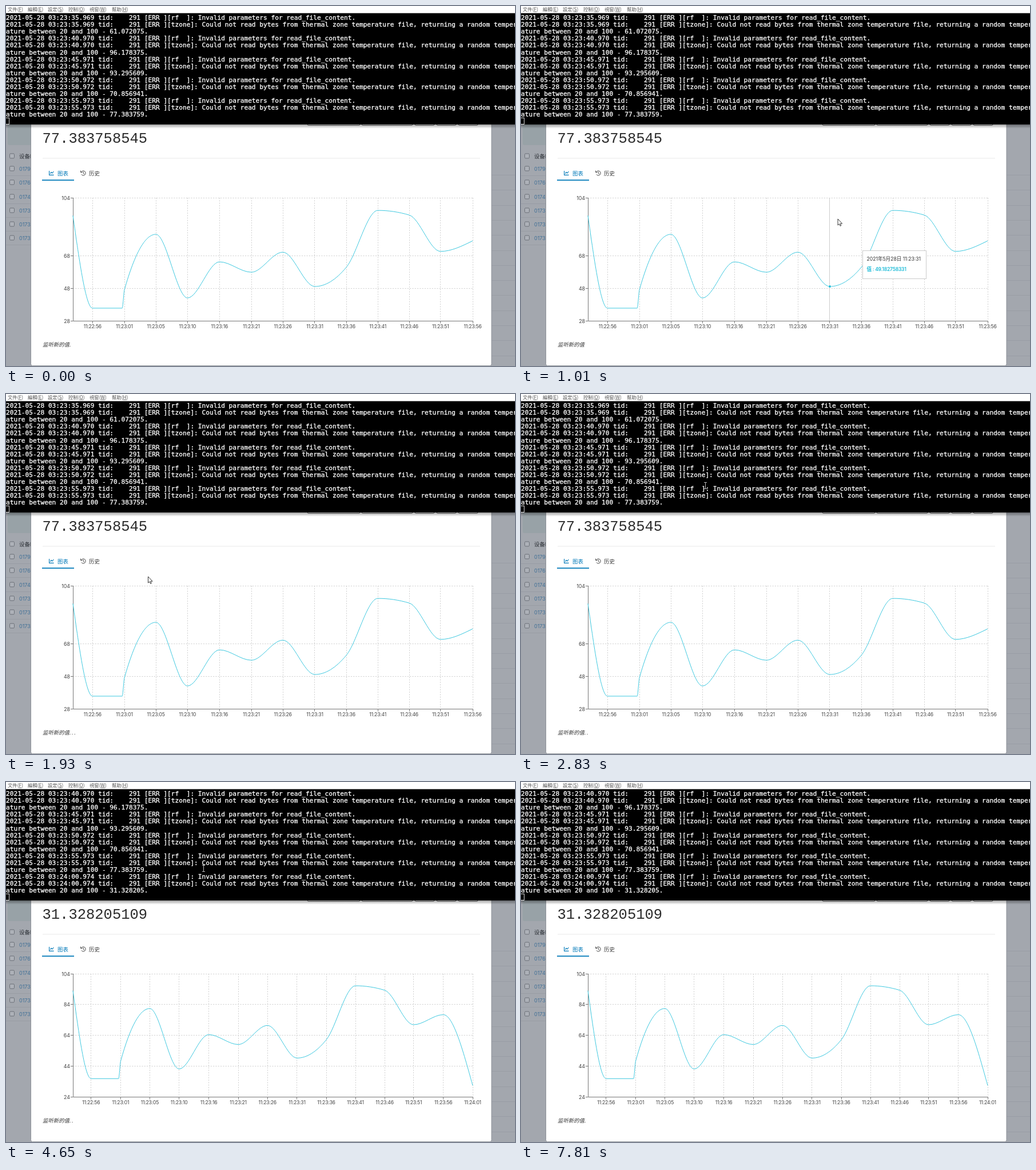
Animation, 890 px wide and 629 px high, one loop 8000 ms. Source, as an HTML page:

```html
<!DOCTYPE html>
<html lang="zh">
<head>
<meta charset="utf-8">
<title>Temperature monitor</title>
<style>
  html, body { margin: 0; width: 100%; height: 100%; overflow: hidden; background: #a3a7ae; }
  svg { display: block; width: 890px; height: 629px; font-family: Inter, "Noto Sans CJK SC", sans-serif; }
  text { white-space: pre; }
  .menu { font: 8.4px "Noto Sans CJK TC", sans-serif; fill: #555; }
  .menu tspan { text-decoration: underline; }
  .term { font: 11.16px "DejaVu Sans Mono", monospace; fill: #fff; }
  .term text { stroke: #fff; stroke-width: .3; }
  .big { font: 25.5px "Liberation Mono", monospace; fill: #2c2c2c; }
  .tick { font-size: 8.8px; fill: #444; }
  .time { font-size: 8.6px; letter-spacing: -.025em; fill: #444; }
  .side { font-size: 9px; fill: #3f6f96; }
  .tab { font-size: 9.4px; }
  .tip { font-size: 8.6px; fill: #333; }
  .wait { font-size: 9.4px; font-style: italic; fill: #333; }
  .grid { stroke: #d0d0d0; stroke-dasharray: 2.15 2.15; fill: none; }
  .axis { stroke: #777; fill: none; }
  .curve { stroke: #3fc9e0; fill: none; }
</style>
</head>
<body>
<svg viewBox="0 0 890 629">
  <defs>
    <linearGradient id="shade" x2="0" y2="1">
      <stop offset="0" stop-opacity=".36"/>
      <stop offset="1" stop-opacity="0"/>
    </linearGradient>
    <clipPath id="screen"><rect y="13" width="890" height="194"/></clipPath>
  </defs>

  <rect width="890" height="629" fill="#a3a7ae"/>
  <rect x="3" y="190" width="60" height="53" rx="3" fill="#98a2a7"/>
  <g id="page"></g>
  <rect x="43.5" y="180.5" width="805.5" height="448" rx="3" fill="#fff" stroke="#8e9299"/>
  <g id="buttons" fill="#fff" stroke="#666"></g>

  <path d="M64 266H829" stroke="#e8e8e8"/>
  <path d="M75.6 288V295.4H83.6M77.4 293L79 290.4L81 292L83.3 289" fill="none" stroke="#0079b8" stroke-width="1.1"/>
  <text class="tab" x="90" y="295.5" fill="#0079b8">图表</text>
  <rect x="63" y="303.4" width="56" height="1.8" fill="#0079b8"/>
  <path d="M131.6 290.2A4 4 0 1 1 131.8 294.2M130.6 287.6V290.6H133.6M135.3 289.6V292.3L137.2 293.6" fill="none" stroke="#444"/>
  <text class="tab" x="145" y="295.5" fill="#333">历史</text>

  <g id="before"></g>
  <g id="after"></g>
  <text class="wait" x="64" y="594.7">监听新的值</text>
  <g id="dots" class="wait"><text x="111" y="594.7">.</text><text x="115" y="594.7">.</text><text x="119.2" y="594.7">.</text></g>

  <g id="hover">
    <path id="rule" d="M0 335V550" stroke="#ccc"/>
    <circle id="spot" r="2.4" fill="#1fbcd8" stroke="#fff" stroke-width=".7"/>
    <g id="tip">
      <rect x=".5" y=".5" width="111" height="49" fill="#fff" stroke="#ccc"/>
      <text id="when" class="tip" x="7.5" y="18"></text>
      <text id="what" class="tip" x="7.5" y="35.5" style="fill:#1fbcd8;font-weight:600;letter-spacing:-.03em"></text>
    </g>
  </g>

  <rect y="207" width="890" height="7" fill="url(#shade)"/>
  <rect width="890" height="13" fill="#fff"/>
  <rect y="12.5" width="890" height="194.5" fill="#000"/>
  <g id="menu" class="menu"></g>
  <g clip-path="url(#screen)" class="term">
    <g id="logBefore"></g>
    <g id="logAfter"></g>
    <rect x="-.5" y="195.5" width="6" height="11" fill="none" stroke="#ddd"/>
  </g>

  <path id="arrow" d="M0 0V11L2.5 8.8L4.1 12.4L5.8 11.7L4.2 8.2H7.6Z" fill="#fff" stroke="#222" stroke-width=".9"/>
  <path id="beam" d="M-2.5 -5.5H2.5M0 -5.5V5.5M-2.5 5.5H2.5" fill="none" stroke="#b5b5b5"/>
</svg>

<script>
const $ = id => document.getElementById(id);
const show = (id, on) => { $(id).style.display = on ? "" : "none"; };
const move = (id, [x, y]) => $(id).setAttribute("transform", `translate(${x} ${y})`);
const text = (cls, x, y, s, more = "") => `<text class="${cls}" x="${x}" y="${y}" ${more}>${s}</text>`;
const pad = n => String(n).padStart(2, "0");

const LEFT = 117, RIGHT = 816, TOP = 335, BOTTOM = 550, MAX = 104;
// Samples are [seconds, value]
const samples = [[0, 93], [3.1, 35.8], [7.78, 35.8], [8.13, 47.1], [13.1, 81.4], [18.1, 42.1],
  [23.15, 64.4], [28.18, 58], [33.15, 70.386], [38.2, 49.183], [43.18, 61.072], [48.15, 96.178],
  [53.12, 93.296], [58.05, 70.857], [63.13, 77.384], [68.13, 31.328]];
const stamps = [-4, 1, 5, 10, 16, 21, 26, 31, 36, 41, 46, 51, 56, 61];
const clock = s => `11:${pad(23 + Math.floor(s / 60))}:${pad((s + 60) % 60)}`;

const points = (count, min) => samples.slice(0, count).map(([t, v]) => [
  LEFT + t / samples[count - 1][0] * (RIGHT - LEFT),
  TOP + (MAX - v) / (MAX - min) * (BOTTOM - TOP)
]);

// Monotone cubic through the points
function curve(p) {
  const last = p.length - 1;
  const dx = i => p[i + 1][0] - p[i][0];
  const s = i => (p[i + 1][1] - p[i][1]) / dx(i);
  const inner = i => {
    const a = s(i - 1), b = s(i);
    const mean = (a * dx(i) + b * dx(i - 1)) / (dx(i - 1) + dx(i));
    return (Math.sign(a) + Math.sign(b)) * Math.min(Math.abs(a), Math.abs(b), Math.abs(mean) / 2);
  };
  const slope = i => i === 0 ? (3 * s(0) - inner(1)) / 2
    : i === last ? (3 * s(last - 1) - inner(last - 1)) / 2 : inner(i);
  let d = `M${p[0]}`;
  for (let i = 0; i < last; i++) {
    const [x0, y0] = p[i], [x1, y1] = p[i + 1], h = dx(i) / 3;
    d += `C${x0 + h} ${y0 + h * slope(i)} ${x1 - h} ${y1 - h * slope(i + 1)} ${x1} ${y1}`;
  }
  return d;
}

function chart(reading, count, levels) {
  const min = levels[levels.length - 1], p = points(count, min);
  let grid = "", axis = `M${LEFT}.5 ${TOP}V${BOTTOM}.5H${RIGHT}`, labels = "";
  for (const v of levels) {
    const y = Math.floor(TOP + (MAX - v) / (MAX - min) * (BOTTOM - TOP)) + .5;
    if (v !== min) grid += `M${LEFT} ${y}H${RIGHT}`;
    axis += `M${LEFT - 4} ${y}h4`;
    labels += text("tick", 112, y + 3, v, 'text-anchor="end"');
  }
  p.filter((q, i) => i === 1 || i > 2).forEach(([x], i) => {
    const px = Math.floor(x) + .5;
    grid += `M${px} ${TOP}V${BOTTOM}`;
    axis += `M${px} ${BOTTOM}v4.5`;
    labels += text("time", x, 562.7, clock(stamps[i]), 'text-anchor="middle"');
  });
  return text("big", 63.5, 238.5, reading) + `<path class="grid" d="${grid}"/>` +
    `<path class="axis" d="${axis}"/>${labels}<path class="curve" d="${curve(p)}"/>`;
}
$("before").innerHTML = chart("77.383758545", 15, [104, 68, 48, 28]);
$("after").innerHTML = chart("31.328205109", 16, [104, 84, 64, 44, 24]);

const log = [["23:35.969", "61.072075"], ["23:40.970", "96.178375"], ["23:45.971", "93.295609"],
  ["23:50.972", "70.856941"], ["23:55.973", "77.383759"], ["24:00.974", "31.328205"]];
const terminal = rows => rows.flatMap(([at, v]) => {
  const head = `2021-05-28 03:${at} tid:    291 [ERR ]`;
  return [head + "[rf  ]: Invalid parameters for read_file_content.",
    head + "[tzone]: Could not read bytes from thermal zone temperature file, returning a random temper",
    `ature between 20 and 100 - ${v}.`];
}).map((s, i) => text("", 0, 24 + 12.1 * i, s)).join("");
$("logBefore").innerHTML = terminal(log.slice(0, 5));
$("logAfter").innerHTML = terminal(log.slice(1));

$("menu").innerHTML = [[3, "文件", "F"], [38, "編輯", "E"], [73, "設定", "S"],
  [109, "控制", "O"], [146, "視窗", "W"], [185, "幫助", "H"]]
  .map(([x, s, key]) => text("menu", x, 8.6, `${s}(<tspan>${key}</tspan>)`)).join("");

$("buttons").innerHTML = [[527, 92], [622, 89], [715, 34], [753, 34], [791, 34]]
  .map(([x, w]) => `<rect x="${x}" y="185.5" width="${w}" height="23" rx="2"/>`).join("");

const box = y => `<rect x="6.5" y="${y - 4}" width="8" height="8" rx="1.5" fill="#adb1b8" stroke="#6c7178"/>`;
let page = box(262) + text("tab", 23, 266, "设备ID", 'fill="#2b2f35" font-weight="500"');
["01794", "01766", "0174b", "01735", "01735", "01735"].forEach((id, i) => {
  const y = 284.3 + 24.15 * i;
  page += box(Math.round(y)) + text("side", 23, y + 4, id) +
    `<path d="M0 ${Math.round(y + 12) + .5}H44" stroke="#989ca4"/>`;
});
for (let i = 0; i < 13; i++)
  page += `<path d="M849 ${Math.round(295 + 26.3 * i) + .5}H890" stroke="#999da5"/>`;
$("page").innerHTML = page;

// Keys are [time, x, y]
const mouse = [[510, 668, 470], [610, 598, 415], [710, 560, 386], [810, 556, 376], [910, 554, 372],
  [1510, 554, 372], [1730, 470, 357], [1830, 340, 335], [1930, 248.5, 319], [2130, 240, 272],
  [2330, 258, 215], [2530, 280, 181], [2830, 322, 160], [3330, 345, 151]];
const tipPath = [[510, 702, 501], [610, 692, 500], [710, 678, 497], [1010, 597, 427],
  [1210, 556, 388], [1310, 549, 381], [1510, 547, 379], [1730, 540, 375]];
function along(keys, t) {
  let i = 1;
  while (i < keys.length - 1 && t > keys[i][0]) i++;
  const [t0, x0, y0] = keys[i - 1], [t1, x1, y1] = keys[i];
  const k = Math.min(1, Math.max(0, (t - t0) / (t1 - t0)));
  return [x0 + (x1 - x0) * k, y0 + (y1 - y0) * k];
}

// Each entry switches the number of trailing dots on by one, wrapping after three
const dotTimes = [290, 610, 910, 1210, 1510, 1810, 2130, 2430, 2730, 3030, 3330, 3630,
  4650, 4850, 5170, 5470, 5770, 6070, 6270, 6590, 6890, 7190, 7490, 7810];
const readings = { 8: "70.386142731", 9: "49.182758331", 10: "61.072074890", 11: "96.178375244" };
const plot = points(15, 28);

function hovered(t) {
  if (t < 510 || t >= 1830) return 0;
  return t < 610 ? 11 : t < 710 ? 10 : t < 1730 ? 9 : 8;
}

function draw(t) {
  show("logBefore", t < 3750);
  show("logAfter", t >= 3750);
  show("before", t < 4650);
  show("after", t >= 4650);

  const dots = (1 + dotTimes.filter(d => d <= t).length) % 4;
  [...$("dots").children].forEach((d, i) => { d.style.display = i < dots ? "" : "none"; });

  const start = t < 1730 ? 510 : 1730;
  const held = Math.min(start + 100 * Math.floor((t - start) / 100), t < 1730 ? 1510 : 3330);
  const at = along(mouse, held), inTerm = at[1] < 207;
  show("arrow", t >= 510 && !inTerm);
  show("beam", t >= 510 && inTerm);
  move("arrow", at);
  move("beam", [Math.round(at[0]) + .5, Math.round(at[1])]);

  const i = hovered(t);
  show("hover", i);
  if (!i) return;
  move("rule", [Math.floor(plot[i][0]) + .5, 0]);
  move("spot", plot[i]);
  move("tip", along(tipPath, held).map(Math.round));
  $("when").textContent = "2021年5月28日 " + clock(stamps[i - 2]);
  $("what").textContent = "值 : " + readings[i];
}

const begin = performance.now();
function loop() {
  draw((performance.now() - begin) % 8000);
  requestAnimationFrame(loop);
}
loop();
</script>
</body>
</html>
```
